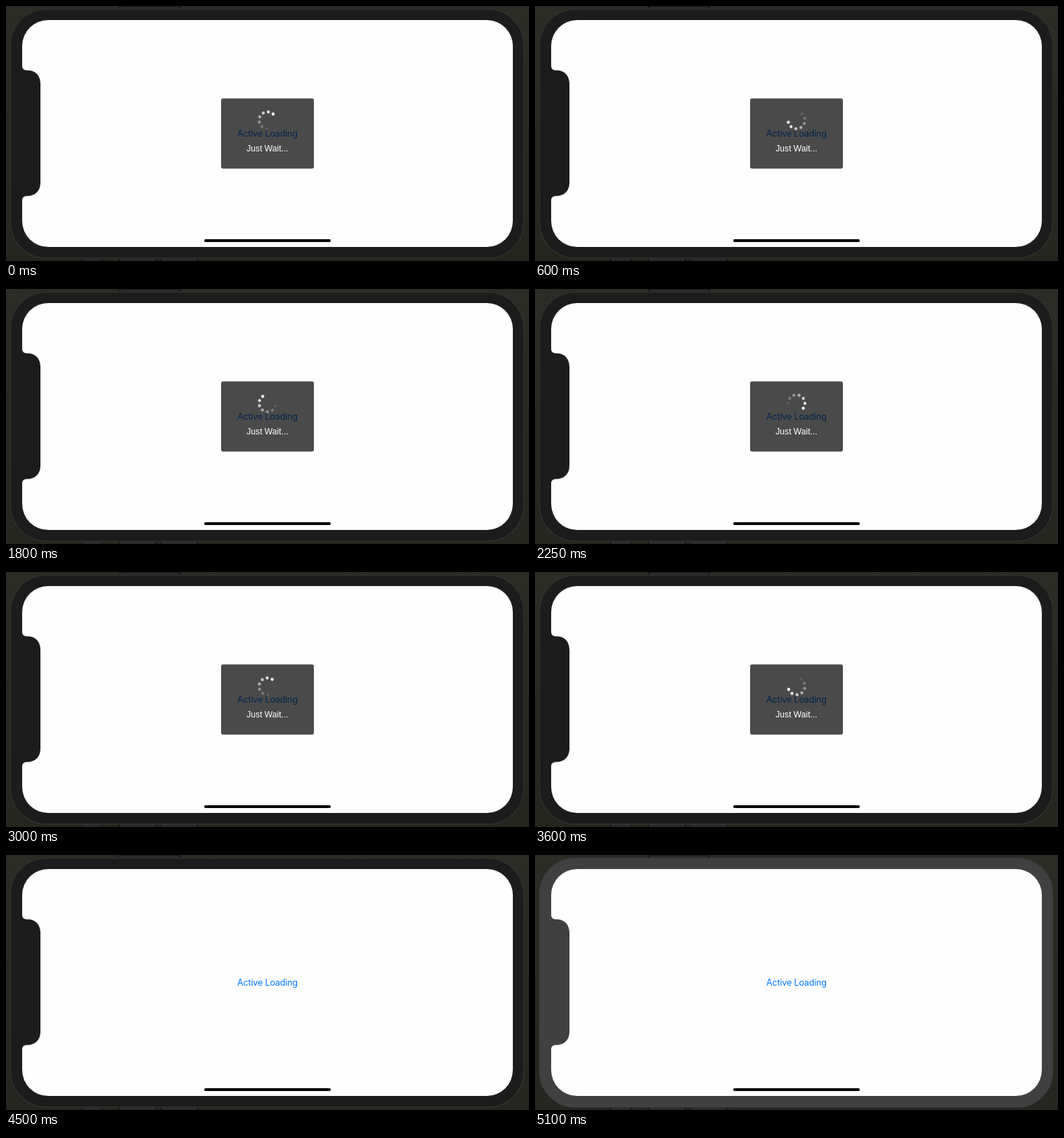
Write an HTML page that moves like this. It is 744x363 px and loops after 5200 ms.

```html
<!DOCTYPE html>
<html lang="en">
<head>
<meta charset="utf-8">
<title>Active Loading</title>
<style>
  html, body { margin: 0; width: 100%; height: 100%; overflow: hidden; background: #292a23; }
  svg { display: block; width: 744px; height: 363px; }
  text { text-anchor: middle; }
  .button { font: 12.6px Inter, sans-serif; letter-spacing: -.2px; fill: #007aff; }
  .status { font: 12.1px "Liberation Sans", Arial, sans-serif; fill: #fff; }
  .keys { fill: #2b2b2b; stroke: #11110f; stroke-width: 1.5; }
  .bezel { --body: #1c1c1c; --rim: #30312d; }
  .bezel.lit { --body: #404040; --rim: #3d3d3d; }
  .frame { fill: var(--body); stroke: var(--rim); stroke-width: 1.5; }
  .notch { fill: var(--body); }
</style>
</head>
<body>
<svg viewBox="0 0 744 363">
  <defs>
    <linearGradient id="desk" x2="0" y2="1">
      <stop stop-color="#2b2c25"/>
      <stop offset="1" stop-color="#25261f"/>
    </linearGradient>
  </defs>
  <rect width="744" height="363" fill="url(#desk)"/>
  <path class="keys" d="M162 0H247.500V6H162zM108 357H136.500V366H108zM161.500 357H213.500V366H161.500zM220.500 357H272.500V366H220.500z"/>
  <g class="bezel" id="bezel">
    <rect class="frame" x="6.500" y="4.500" width="730" height="354.500" rx="51"/>
    <rect x="23" y="20" width="698" height="323" rx="37" fill="#fefefe"/>
    <path class="notch" d="M22 85H23C23 89 25 91.500 30 91.500C42 91.500 49 99 49 111V251C49 263 42 270.500 30 270.500C25 270.500 23 273 23 277H22z"/>
  </g>
  <rect x="282" y="332" width="180" height="4" rx="2"/>
  <text class="button" x="372" y="186.300">Active Loading</text>
  <g id="hud">
    <rect x="306" y="131.500" width="132" height="100" rx="3" fill="#000" fill-opacity=".705"/>
    <g id="dots" fill="#fff"></g>
    <text class="status" x="372" y="206.700">Just Wait...</text>
  </g>
</svg>
<script>
  const LOOP = 5200, STEP = 150, DOTS = 7;
  const byId = id => document.getElementById(id);
  const hud = byId("hud"), dots = byId("dots"), bezel = byId("bezel");

  // A fading tail of dots, 36 degrees apart, behind the leading one
  for (let i = 0; i < DOTS; i++) {
    const dot = document.createElementNS("http://www.w3.org/2000/svg", "circle");
    const angle = -i * Math.PI / 5;
    dot.setAttribute("cx", 12 * Math.cos(angle));
    dot.setAttribute("cy", 12 * Math.sin(angle));
    dot.setAttribute("r", 2.2);
    dot.setAttribute("opacity", 1 - .15 * i);
    dots.append(dot);
  }

  function hudOpacity(t) {
    if (t < 4200) return 1;
    if (t < 4350) return .92;
    return t < 4500 ? .45 : 0;
  }

  function draw(now) {
    const t = now % LOOP;
    const turn = -48 + 53.6 * Math.floor(t / STEP);
    dots.setAttribute("transform", `translate(372 162.7) rotate(${turn})`);
    hud.setAttribute("opacity", hudOpacity(t));
    bezel.classList.toggle("lit", t >= 5100);
  }

  const start = performance.now();
  function tick() {
    draw(performance.now() - start);
    requestAnimationFrame(tick);
  }
  tick();
</script>
</body>
</html>
```
